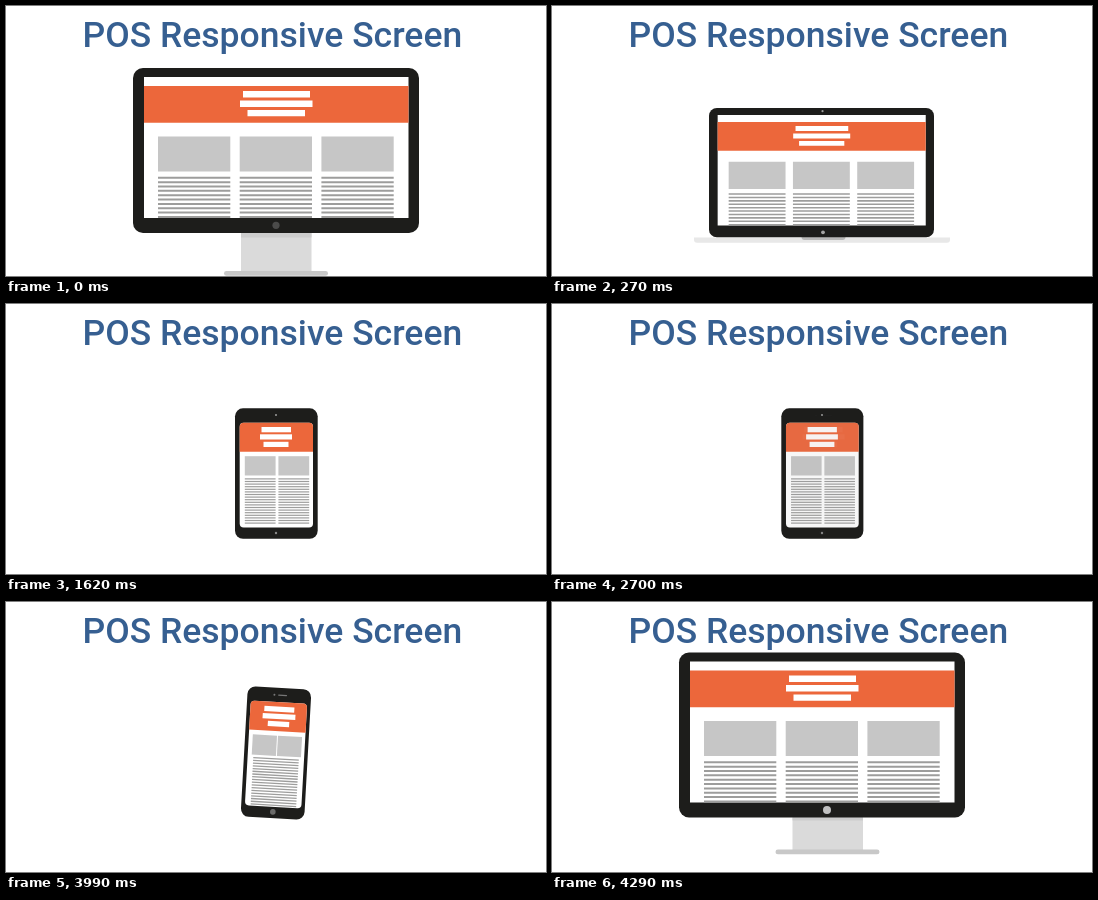
Animation of 540 by 270 pixels, one loop 5.4 s. Source, as an HTML page with a canvas:

```html
<!DOCTYPE html>
<html lang="en">
<head>
<meta charset="utf-8">
<title>POS Responsive Screen</title>
<style>
  html, body { margin: 0; width: 100%; height: 100%; overflow: hidden; background: #fff; }
  canvas, svg { position: absolute; left: 0; top: 0; width: 540px; height: 270px; }
  text { font: 500 35.5px Roboto, Inter, sans-serif; fill: #365f91; }
</style>
</head>
<body>
<canvas></canvas>
<svg viewBox="0 0 540 270"><text x="76.5" y="41">POS Responsive Screen</text></svg>
<script>
const LOOP = 5400, STEP = 30;
const BODY = '#1d1d1b', ORANGE = '#ec673b', CARD = '#c6c6c6', LINE = '#9d9d9c', WHITE = '#fff';

const canvas = document.querySelector('canvas');
const ctx = canvas.getContext('2d');
const ratio = window.devicePixelRatio || 1;
canvas.width = 540 * ratio;
canvas.height = 270 * ratio;

const clamp = v => Math.min(1, Math.max(0, v));
const smooth = v => { const p = clamp(v); return p * p * (3 - 2 * p); };
const mix = (a, b, p) => a + (b - a) * p;

function box(x1, y1, x2, y2, color, radius = 0) {
  ctx.fillStyle = color;
  ctx.beginPath();
  ctx.roundRect(x1, y1, x2 - x1, y2 - y1, radius);
  ctx.fill();
}

function dot(x, y, radius, color) {
  ctx.fillStyle = color;
  ctx.beginPath();
  ctx.arc(x, y, radius, 0, Math.PI * 2);
  ctx.fill();
}

function lines(x1, x2, top, pitch, count, height) {
  for (let i = 0; i < count; i++) {
    const y = top + i * pitch;
    box(x1, y, x2, y + height, LINE);
  }
}

function wideScreen() {
  box(127, 62, 413, 227, BODY, 10);
  box(138, 71, 402.5, 212, WHITE);
  box(138, 80, 402.5, 116.7, ORANGE);
  box(237, 85, 304, 91.5, WHITE);
  box(234, 94.5, 306.5, 101, WHITE);
  box(241.5, 104, 299, 110.3, WHITE);
  for (const x of [152, 233.7, 315.4]) {
    box(x, 130.5, x + 72.3, 165.5, CARD);
    lines(x, x + 72.3, 170.8, 4.35, 10, 2);
  }
}

// Header shared by the two handheld devices
function tallScreen(x1, x2) {
  box(x1, 118.7, x2, 223.5, WHITE, 4);
  box(x1, 118.7, x2, 147.7, ORANGE, [4, 4, 0, 0]);
}

// Each device is drawn in its resting place; "frame" is its outline there.
const monitor = {
  frame: [127, 62, 413, 227],
  draw() { wideScreen(); dot(270, 219.3, 3.6, '#4b4b4a'); }
};
const bigButtonMonitor = {
  frame: monitor.frame,
  draw() { wideScreen(); dot(275, 219.5, 4, '#c0c0c0'); }
};
const laptop = {
  frame: monitor.frame,
  home: [157, 102, 382, 231.3],
  draw() {
    wideScreen();
    dot(271.3, 66, 1.4, '#9d9d9c');
    dot(271.9, 220.7, 2.4, '#a5a5a5');
  }
};
const tablet = {
  frame: [229, 104.3, 311.7, 234.8],
  draw() {
    box(...this.frame, BODY, 8);
    tallScreen(233.7, 307);
    box(255.5, 123, 285, 128.3, WHITE);
    box(254, 130.3, 286, 135.5, WHITE);
    box(257.5, 137.8, 282.5, 143, WHITE);
    for (const x of [238.8, 272.4]) {
      box(x, 152.2, x + 30.8, 171.5, CARD);
      lines(x, x + 30.8, 174.3, 2.6, 18, 1.2);
    }
    dot(270, 111, 1, '#9d9d9c');
    dot(270, 229, 1.2, '#8a8a8a');
  }
};
const phone = {
  frame: [238.3, 104.3, 302, 234.8],
  draw() {
    box(...this.frame, BODY, 8);
    tallScreen(242, 298.5);
    box(256, 123, 286, 128.3, WHITE);
    box(254.7, 130.3, 287.5, 135.5, WHITE);
    box(260.3, 137.8, 281.7, 143, WHITE);
    box(246, 152.2, 270.2, 172.5, CARD);
    box(271.2, 152.2, 295.3, 172.5, CARD);
    lines(247.7, 293.3, 174.8, 2.73, 18, 1.3);
    dot(265.3, 111.5, 1, '#777');
    box(269, 111, 278, 112.2, '#777', 0.6);
    dot(270.3, 228.5, 2.8, '#6b6b6a');
  }
};

function place(device, target, angle = 0, alpha = 1) {
  const [x1, y1, x2, y2] = target, [a1, b1, a2, b2] = device.frame;
  ctx.save();
  ctx.globalAlpha = alpha;
  ctx.translate((x1 + x2) / 2, (y1 + y2) / 2);
  ctx.rotate(angle * Math.PI / 180);
  ctx.scale((x2 - x1) / (a2 - a1), (y2 - y1) / (b2 - b1));
  ctx.translate(-(a1 + a2) / 2, -(b1 + b2) / 2);
  device.draw();
  ctx.restore();
}

function morph(from, start, to, end, p) {
  const target = start.map((v, i) => mix(v, end[i], p));
  if (p < 1) place(from, target);
  if (p > 0) place(to, target, 0, p);
}

function stand(dx, dy) {
  box(235 + dx, 200 + dy, 305.5 + dx, 266 + dy, '#dadada');
  box(235 + dx, 227, 305.5 + dx, Math.max(227, 231.5 + Math.min(dy, 0) / 4), '#cdcdcd');
  box(218 + dx, 265 + dy, 322 + dx, 269.8 + dy, '#c8c8c8', 2.4);
}

function laptopBase(half, x) {
  if (half <= 0) return;
  box(x - half, 231.6, x + half, 236.8, '#e8e8e8', [0, 0, 3, 3]);
  const notch = Math.min(22, half);
  box(x + 1.5 - notch, 231, x + 1.5 + notch, 234, '#b8b8b8', [0, 0, 3, 3]);
}

function monitorToLaptop(k) {
  if (k < 6) stand(0, 12 * k);
  laptopBase(128 * smooth((k - 4) / 5), 270);
  morph(monitor, monitor.frame, laptop, laptop.home, smooth(k / 9));
}

function laptopToTablet(k) {
  if (k < 8) laptopBase(128 - 13.5 * k, 270.5);
  morph(laptop, [158, 101.5, 383, 231], tablet, tablet.frame, smooth((k - 1) / 7));
}

function tabletToPhone(k) {
  morph(tablet, tablet.frame, phone, phone.frame, smooth(k / 9));
}

// The phone spins a quarter turn while it grows, swings past and settles.
function phoneToMonitor(k) {
  const p = smooth((k - 1) / 8);
  const angle = k <= 9 ? 94 * smooth(k / 9) : 94 - 2 * (k - 9);
  const w = mix(63.7, 165, p) / 2, h = mix(130.5, 286, p) / 2;
  const cx = 270, cy = mix(151, 133, p);
  const wide = [cx - h, cy - w, cx + h, cy + w];
  if (k >= 8) {
    const drop = [-40, -15, 5, -6][k - 8];
    place({ frame: monitor.frame, draw: () => stand(5.5, drop) }, wide, angle - 90);
  }
  if (p < 1) place(phone, [cx - w, cy - h, cx + w, cy + h], angle);
  if (p > 0) place(bigButtonMonitor, wide, angle - 90, p);
}

const scenes = [
  { start: 3960, steps: 11, draw: phoneToMonitor },
  { start: 2670, steps: 9, draw: tabletToPhone },
  { start: 1380, steps: 8, draw: laptopToTablet },
  { start: 0, steps: 9, draw: monitorToLaptop }
];

function render(time) {
  ctx.setTransform(ratio, 0, 0, ratio, 0, 0);
  ctx.clearRect(0, 0, 540, 270);
  const scene = scenes.find(s => time >= s.start + (s.start && STEP)) || scenes[3];
  scene.draw(Math.min(scene.steps, Math.floor((time - scene.start) / STEP)));
}

const origin = performance.now();
function tick() {
  render((performance.now() - origin) % LOOP);
  requestAnimationFrame(tick);
}
tick();
</script>
</body>
</html>
```
